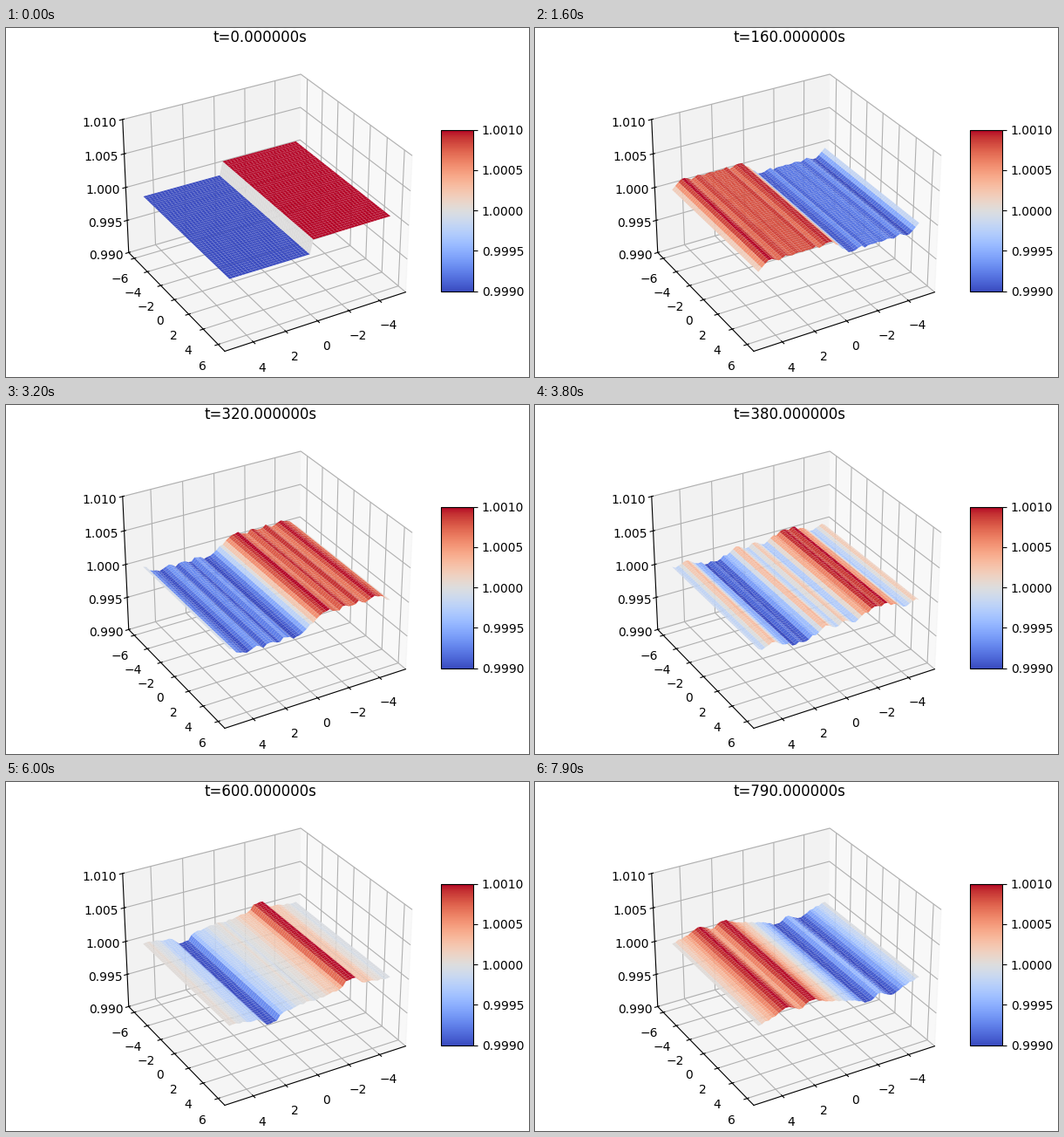
These frames come from a looping animation (600x400 px, 8 s). A matplotlib script:

```python
import numpy as np
import matplotlib.pyplot as plt
from matplotlib import cm
from matplotlib.animation import FuncAnimation
from matplotlib.colors import Normalize

FRAMES, INTERVAL, STEP = 80, 100, 10
WIDTH, HEIGHT = 600, 400
NX, NY = 50, 50
SPEED = 0.03095
AMP = 0.001

x = np.linspace(-5, 5, NX)
y = np.linspace(-6, 6, NY)
X, Y = np.meshgrid(x, y)
dx = x[1] - x[0]
start = -np.sign(x)

# Sine modes of the staggered-grid wave equation, fixed level at both ends
k = np.arange(1, NX - 1) * np.pi / 10
modes = np.sin(np.outer(x + 5, k))
weights = 2 / (NX - 1) * modes.T @ start
omega = 2 * SPEED / dx * np.sin(k * dx / 2)


def level(t):
    wave = start if t == 0 else modes @ (weights * np.cos(omega * t))
    return 1 + AMP * wave


def quads(z):
    grid = np.stack([X, Y, np.broadcast_to(z, X.shape)], axis=-1)
    corners = grid[:-1, :-1], grid[:-1, 1:], grid[1:, 1:], grid[1:, :-1]
    return np.stack(corners, axis=2).reshape(-1, 4, 3)


def box(left, top, width, height):
    return (left / WIDTH, 1 - (top + height) / HEIGHT,
            width / WIDTH, height / HEIGHT)


fig = plt.figure(figsize=(WIDTH / 100, HEIGHT / 100), dpi=100)
ax = fig.add_axes(box(107, 24.4, 369.4, 369.4), projection="3d")
surf = ax.plot_surface(X, Y, np.broadcast_to(level(0), X.shape),
                       cmap=cm.coolwarm, linewidth=0)
ax.set_zlim(0.99, 1.01)
ax.set_zticks(np.linspace(0.99, 1.01, 5))
ax.view_init(30, 60)
title = ax.set_title("t=0.000000s")

scale = cm.ScalarMappable(Normalize(1 - AMP, 1 + AMP), cm.coolwarm)
fig.colorbar(scale, cax=fig.add_axes(box(499.3, 116.8, 36.9, 184.7)),
             ticks=np.linspace(1 - AMP, 1 + AMP, 5))


def update(i):
    t = i * STEP
    faces = quads(level(t))
    heights = faces[..., 2].mean(axis=1)
    peak = max(AMP, np.abs(heights - 1).max())
    surf.set_verts(faces)
    surf.set_array(heights)
    surf.set_clim(1 - peak, 1 + peak)
    title.set_text(f"t={t:f}s")
    return surf, title


anim = FuncAnimation(fig, update, frames=FRAMES, interval=INTERVAL,
                     repeat=True, repeat_delay=0)
plt.show()
```
